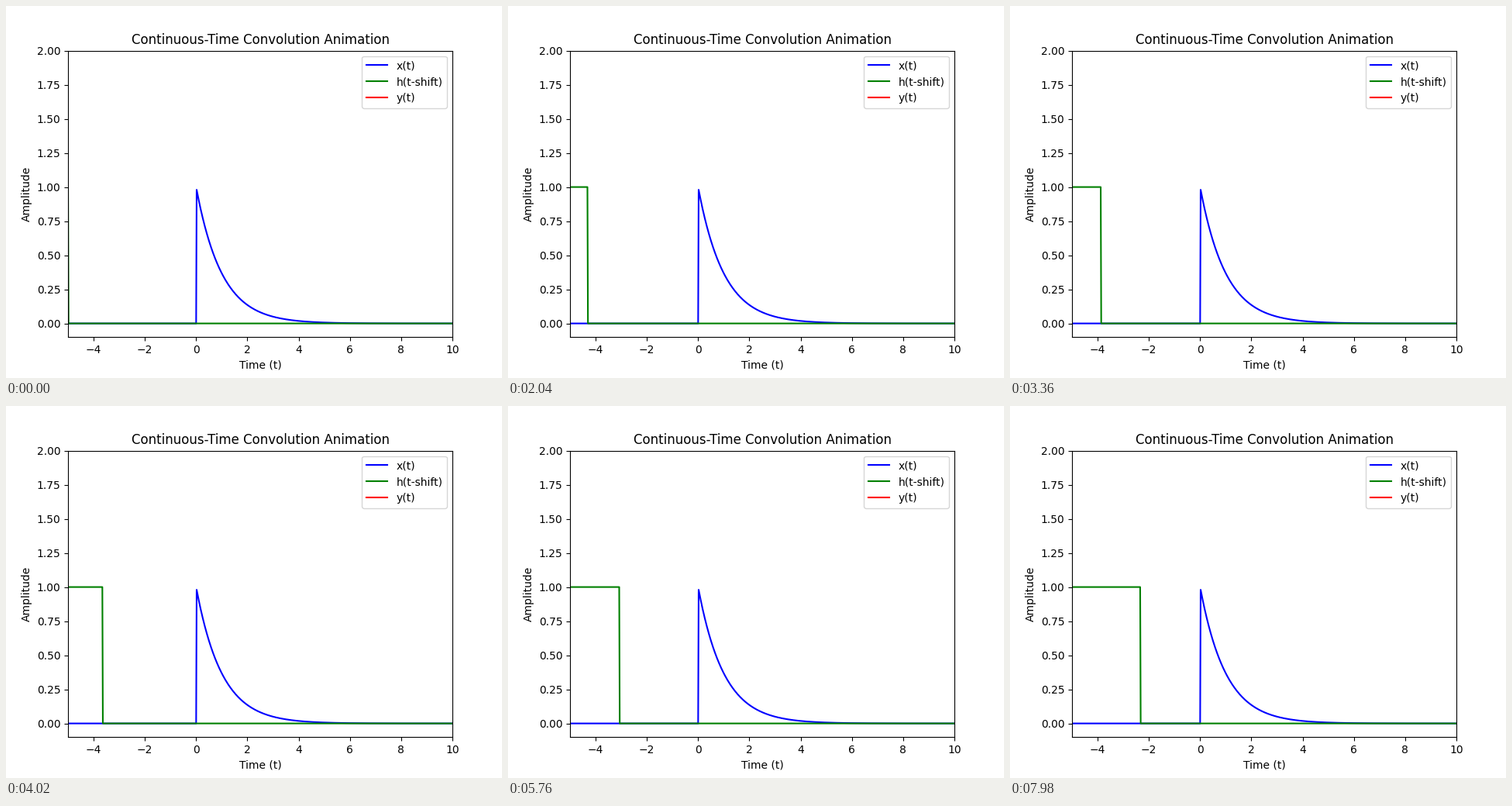
These frames come from a looping animation (640 by 480 pixels, 8 s). A matplotlib script:

```python
import numpy as np
import matplotlib.pyplot as plt
from matplotlib.animation import FuncAnimation

LOOP_MS = 8000
TICK_MS = 20
TICKS_PER_STEP = 3  # the pulse advances one sample every 60 ms

t = np.arange(-5, 10, 0.02)
x = np.where(t >= 0, np.exp(-t), 0)

fig, ax = plt.subplots(figsize=(6.4, 4.8), dpi=100)
ax.set_xlim(-5, 10)
ax.set_ylim(-0.1, 2)
ax.set_title("Continuous-Time Convolution Animation")
ax.set_xlabel("Time (t)")
ax.set_ylabel("Amplitude")

ax.plot(t, x, "b-", label="x(t)")
pulse, = ax.plot([], [], "g-", label="h(t-shift)")
ax.plot([], [], "r-", label="y(t)")
ax.legend(loc="upper right")


def update(tick):
    shift = t[tick // TICKS_PER_STEP]
    pulse.set_data(t, np.where(t <= shift, 1.0, 0.0))
    return pulse,


def init():
    return update(0)


anim = FuncAnimation(fig, update, frames=LOOP_MS // TICK_MS, init_func=init,
                     interval=TICK_MS, repeat=True, repeat_delay=0, blit=True)
plt.show()
```
